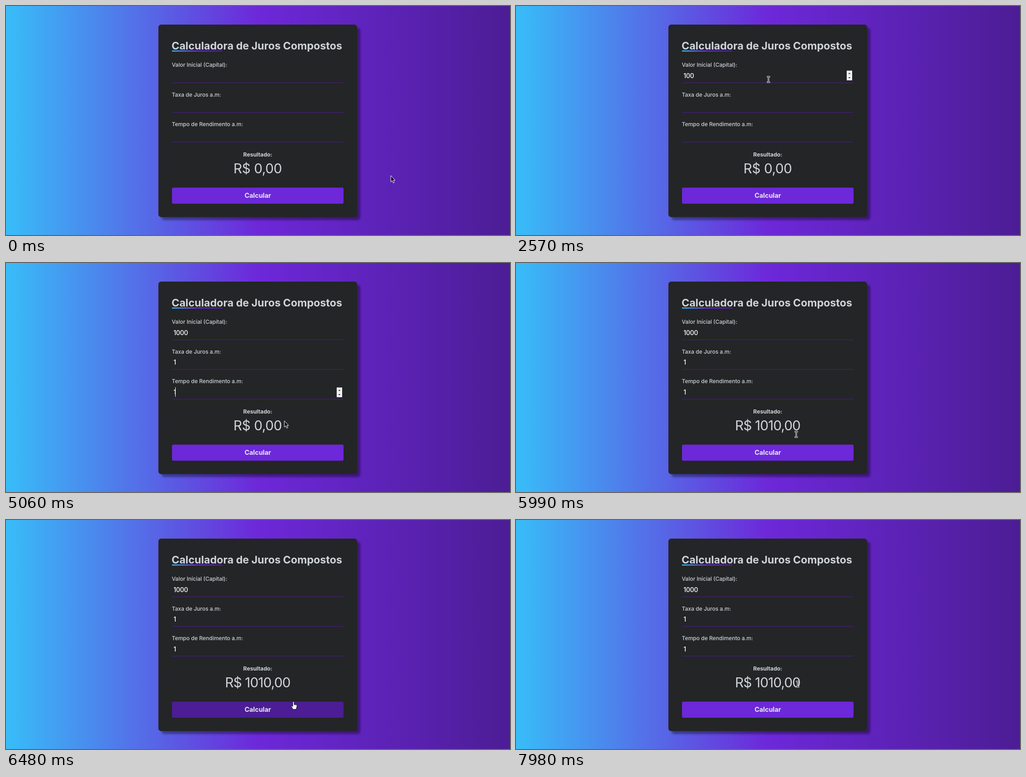
An HTML page that plays this animation: 1108 px wide and 505 px high, repeating every 8000 ms.

```html
<!DOCTYPE html>
<html lang="pt-BR">
<head>
<meta charset="utf-8">
<title>Calculadora de Juros Compostos</title>
<style>
html, body { margin: 0; width: 100%; height: 100%; overflow: hidden; }
svg { display: block; width: 1108px; height: 505px; font-family: Inter, "Open Sans", sans-serif; font-optical-sizing: none; }
text { fill: #ced4da; white-space: pre; }
.shadow { filter: blur(2px); }
.soft { filter: blur(.4px); }
.title { font-size: 23.2px; font-weight: 700; }
.label { font-size: 12px; font-weight: 500; }
.strong { font-size: 12.2px; font-weight: 700; }
.total { font-size: 29.6px; font-weight: 400; }
.value { font-size: 14px; font-weight: 500; letter-spacing: -.3px; fill: #fff; }
.action { font-size: 14.3px; font-weight: 700; fill: #e9ecef; }
.mid { text-anchor: middle; }
</style>
</head>
<body>
<svg viewBox="0 0 1108 505">
  <defs>
    <linearGradient id="sky">
      <stop offset="0" stop-color="#38bdf8"/>
      <stop offset=".5" stop-color="#6d28d9"/>
      <stop offset="1" stop-color="#4c1d95"/>
    </linearGradient>
  </defs>
  <rect width="1108" height="505" fill="url(#sky)"/>
  <rect class="shadow" x="342" y="48" width="437" height="424" rx="6" fill="#000" opacity=".36"/>
  <rect class="soft" x="335" y="41" width="437" height="424.5" rx="6" fill="#242526"/>
  <text class="title" x="364" y="95.5">Calculadora de Juros Compostos</text>
  <rect x="365" y="98" width="111" height="2.5" fill="url(#sky)"/>
  <g id="fields"></g>
  <text class="strong mid" x="553.5" y="331.5">Resultado:</text>
  <text id="total" class="total mid" x="553.3" y="369"></text>
  <rect id="button" class="soft" x="365" y="400.5" width="377" height="35.5" rx="3"/>
  <text class="action mid" x="553.5" y="423.3">Calcular</text>
  <rect id="caret" width="1" height="21" fill="#fff"/>
  <g id="arrow">
    <path d="M0 0V14L3.2 11.2L5.3 16.3L7.6 15.3L5.5 10.3H9.3Z" fill="#111" stroke="#fff"/>
  </g>
  <g id="beam" fill="none">
    <path d="M-3.5-6h7M-3.5 6h7M0-6V6" stroke="#eee" stroke-width="3"/>
    <path d="M-3-6h6M-3 6h6M0-6V6" stroke="#111"/>
  </g>
  <g id="hand">
    <path d="M-1.5 1.8a1.5 1.5 0 0 1 3 0V6.3l4.6 1.1q1.6.5 1.5 2.1L7 13.5l-1.2 4H-1.2L-4.4 11.6q-.9-2 .9-1.9l2 1.7Z" fill="#fff" stroke="#111"/>
    <path d="M1.5 6.3v2.4M4 7.2v1.8" stroke="#111" stroke-width=".8"/>
  </g>
</svg>
<script>
const LOOP = 8000, BLINK = 530, SUBMIT = 5540, RESULT = 5610, DRIFT = 7270;
const $ = id => document.getElementById(id);
const show = (el, on) => el.setAttribute('display', on ? 'inline' : 'none');
const smooth = u => u * u * (3 - 2 * u);
const progress = (t, from, length) => Math.min(1, Math.max(0, (t - from) / length));

// When each field is clicked and when each of its keys is pressed
const fields = [
  { label: 'Valor Inícial (Capital):', text: '1000', click: 750, keys: [1670, 1920, 2040, 2900] },
  { label: 'Taxa de Juros a.m:', text: '1', click: 3860, keys: [3980] },
  { label: 'Tempo de Rendimento a.m:', text: '1', click: 4420, keys: [4650] }
];
fields.forEach((f, i) => {
  f.top = 142 + 66 * i;
  f.line = 169 + 65.3 * i;
  f.blur = i < 2 ? fields[i + 1].click : SUBMIT;
});

$('fields').innerHTML = fields.map(f => `
  <text class="label" x="364.5" y="${f.line - 34.6}">${f.label}</text>
  <rect x="365" y="${f.line}" width="377" height="1" fill="#4c1d95"/>
  <text class="value" x="368.3" y="${f.line - 10}"></text>
  <g transform="translate(727 ${f.top})">
    <rect y=".5" width="12" height="21.5" fill="#f0f0f0"/>
    <path d="M3.5 8L6 5L8.5 8ZM3.5 15L6 18L8.5 15Z" fill="#444"/>
  </g>`).join('');
const values = document.querySelectorAll('.value');
const spinners = $('fields').querySelectorAll('g');

const [capital, rate, months] = fields.map(f => +f.text);
const money = n => 'R$ ' + n.toFixed(2).replace('.', ',');

// Pointer strokes: start, duration, end x, end y
const home = [846, 374];
const strokes = [
  [20, 380, 555, 162],
  [3400, 260, 610, 218],
  [3990, 270, 588, 286],
  [4820, 510, 640, 421],
  [5830, 200, 613, 373],
  [6030, 240, 606, 467],
  [6270, 210, 632, 400],
  [6680, 120, 640, 467],
  [6800, DRIFT - 6800, 618, 342]
];

function pointer(t) {
  let [x, y] = home;
  for (const [start, length, toX, toY] of strokes) {
    const u = smooth(progress(t, start, length));
    x += (toX - x) * u;
    y += (toY - y) * u;
  }
  // Closing sweep to the left over the result and back
  const u = progress(t, DRIFT, 7980 - DRIFT), swing = Math.sin(Math.PI * u);
  return [x - 74 * swing * swing + u, y + 20 * u + 12 * swing];
}

function draw(t) {
  const [x, y] = pointer(t).map(Math.round);
  const within = (l, top, r, bottom) => x >= l && x <= r && y >= top && y <= bottom;
  const done = t >= RESULT;
  const onButton = within(365, 400, 742, 436);
  const half = done ? 72 : 53;
  let onText = within(553 - half, 335, 554 + half, 383);

  show($('caret'), false);
  fields.forEach((f, i) => {
    const over = within(365, f.top, 742, f.line + 1);
    const focused = t >= f.click && t < f.blur;
    const pressed = f.keys.filter(k => k <= t);
    const count = pressed.length;
    values[i].textContent = f.text.slice(0, count);
    show(spinners[i], focused || over);
    onText = onText || over;
    if (focused) {
      const since = count ? pressed[count - 1] : f.click;
      show($('caret'), Math.floor((t - since) / BLINK) % 2 === 0);
      $('caret').setAttribute('x', count ? Math.round(362.6 + 9.4 * count) : 368);
      $('caret').setAttribute('y', Math.round(f.line - 26));
    }
  });

  $('total').textContent = money(done ? capital * (1 + rate / 100) ** months : 0);
  $('total').setAttribute('letter-spacing', done ? -.85 : -.4);
  $('button').setAttribute('fill', onButton ? '#4c1d95' : '#6d28d9');

  const kind = onButton ? 'hand' : onText ? 'beam' : 'arrow';
  for (const id of ['arrow', 'beam', 'hand']) show($(id), id === kind);
  $(kind).setAttribute('transform', `translate(${x} ${y})`);
}

const start = performance.now();
function tick(now) {
  draw(Math.max(0, now - start) % LOOP);
  requestAnimationFrame(tick);
}
draw(0);
requestAnimationFrame(tick);
</script>
</body>
</html>
```
